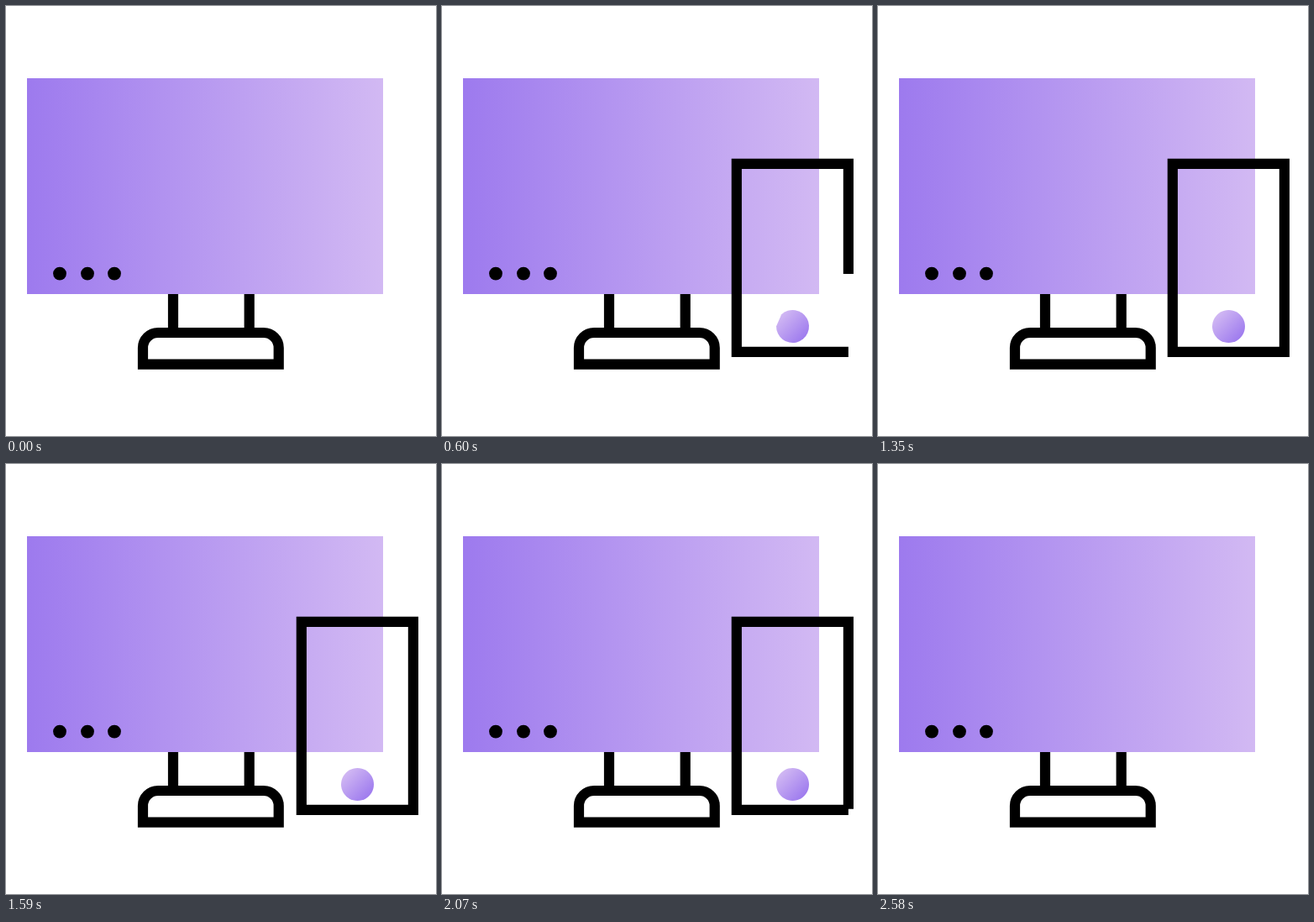
An HTML page that plays this animation: 512x512 px, repeating every 2.67 s.

```html
<!DOCTYPE html>
<html lang="en">
<head>
<meta charset="utf-8">
<title>Monitor and phone</title>
<style>
  html, body { margin: 0; width: 100%; height: 100%; overflow: hidden; background: #fff; }
  svg { display: block; width: 100vw; height: 100vh; }
</style>
</head>
<body>
<svg viewBox="0 0 512 512">
  <defs>
    <linearGradient id="screen">
      <stop stop-color="#9d7aee"/>
      <stop offset="1" stop-color="#d2b9f3"/>
    </linearGradient>
    <linearGradient id="button" gradientUnits="userSpaceOnUse" x1="403" y1="367" x2="432" y2="396">
      <stop stop-color="#d2b9f3"/>
      <stop offset="1" stop-color="#9d7aee"/>
    </linearGradient>
  </defs>
  <g fill="none" stroke="#000" stroke-width="12.2">
    <path d="M199 340V389M289.7 340V389"/>
    <path d="M163 426.7V407a18 18 0 0 1 18-18H306.7a18 18 0 0 1 18 18V426.7Z"/>
  </g>
  <path fill="url(#screen)" d="M25 86H449V343H25Z"/>
  <circle cx="64" cy="318.6" r="7.9"/>
  <circle cx="97" cy="318.6" r="7.9"/>
  <circle cx="129" cy="318.6" r="7.9"/>
  <g id="phone">
    <path id="home" fill="url(#button)"/>
    <path id="frame" fill="none" stroke="#000" stroke-width="12.2" pathLength="1"
      d="M483.9 411.9H350.8V187.8H483.9Z"/>
  </g>
</svg>
<script>
  const LOOP = 2670, DRAW = 500, IN = 214, OUT = 2059;
  const SHAKE = 870, PERIOD = 122.5, SHAKES = 7, REACH = 5;
  const [phone, home, frame] = ['phone', 'home', 'frame'].map(id => document.getElementById(id));

  const ease = x => {
    x = Math.min(1, Math.max(0, x));
    return x * x * (3 - 2 * x);
  };

  // Each shake goes right and returns to rest.
  const shift = t => {
    const n = (t - SHAKE) / PERIOD;
    if (n < 0 || n >= SHAKES) return 0;
    return Math.round(REACH * ease(1 - Math.abs(2 * (n % 1) - 1)));
  };

  // Part p of the circle, counterclockwise from its left, closed by a chord.
  const segment = (cx, cy, r, p) => {
    const a = Math.PI - 2 * Math.PI * Math.min(p, 0.99999);
    const x = cx + r * Math.cos(a), y = cy + r * Math.sin(a);
    return `M${cx - r} ${cy}A${r} ${r} 0 ${p > 0.5 ? 1 : 0} 0 ${x} ${y}Z`;
  };

  function draw(now) {
    const t = now % LOOP;
    const p = ease((t - IN) / DRAW) - ease((t - OUT) / DRAW);
    phone.style.display = p > 0 ? '' : 'none';
    phone.setAttribute('transform', `translate(${shift(t)} 0)`);
    frame.setAttribute('stroke-dasharray', p < 1 ? `${p} 2` : 'none');
    home.setAttribute('d', segment(417.5, 381.5, 19.5, p));
  }

  const start = performance.now();
  function tick() {
    draw(performance.now() - start);
    requestAnimationFrame(tick);
  }
  tick();
</script>
</body>
</html>
```
